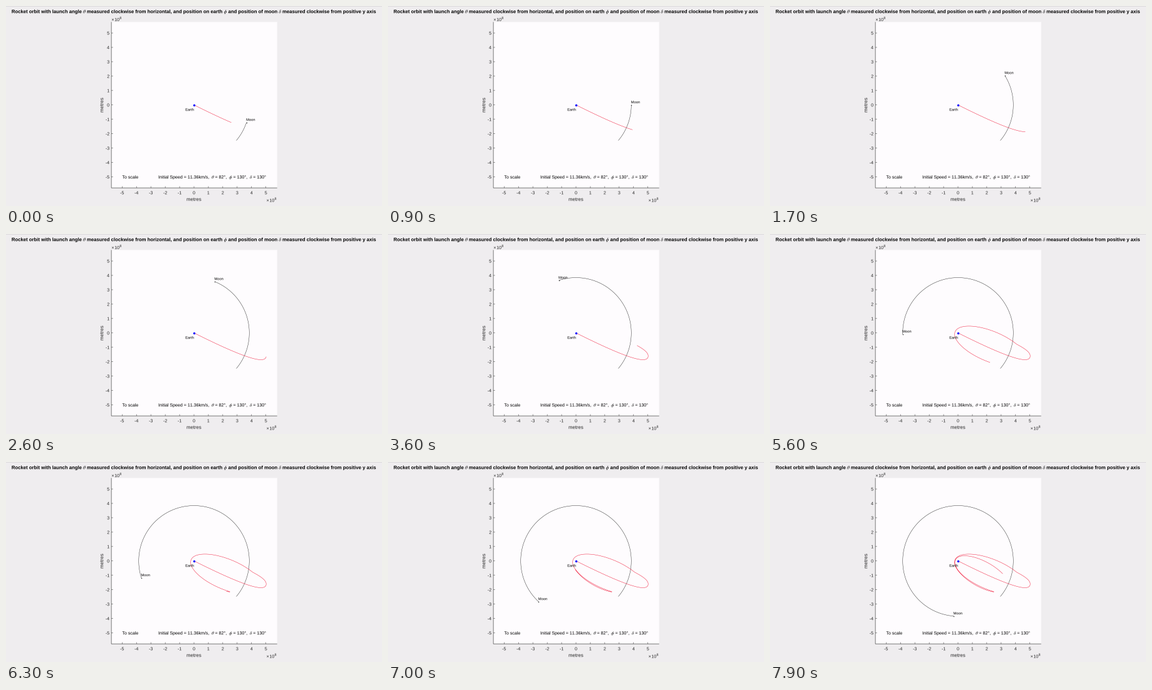
These frames come from a looping animation (600 px wide and 319 px high, 8 s). A matplotlib script:

```python
import numpy as np
import matplotlib.pyplot as plt
from matplotlib.animation import FuncAnimation
from matplotlib.patches import PathPatch, Rectangle
from matplotlib.textpath import TextPath
from matplotlib.transforms import Affine2D

W, H, DPI = 600, 319, 64
PT = 72 / DPI                      # points per pixel
FRAMES, STEP = 80, 100
CX, CY, UNIT = 300, 157.8, 22.95   # earth position, pixels per 1e8 m
MOON_R = 3.845 * UNIT
PERIOD = 0.017                     # frames per radian of mean anomaly / a^1.5
INK = "#262626"

plt.rcParams["mathtext.fontset"] = "stix"


def moon_angle(i):
    """Degrees counter-clockwise from +x; slower at the start and near t=60."""
    return np.interp(i, [0, 9, 36, 56, 63, 79],
                     [-18.5, 0, 108.1, 181.3, 197.8, 265.5])


def bezier(p, t0, t1, n=200):
    """Cubic curve relative to earth, as rows of time, x, y."""
    u = np.linspace(0, 1, n)
    b = np.column_stack([(1 - u)**3, 3*u*(1 - u)**2, 3*u*u*(1 - u), u**3])
    return np.column_stack([t0 + u * (t1 - t0), b @ np.array(p) + (CX, CY)])


def kepler(p, e, axis, start, end, perigee, n=600):
    """Conic with earth at the focus, timed by Kepler's equation."""
    nu = np.radians(np.linspace(start, end, n))
    r = p / (1 + e * np.cos(nu))
    ecc = 2 * np.arctan(np.sqrt((1 - e) / (1 + e)) * np.tan(nu / 2))
    mean = (ecc - e * np.sin(ecc)) * np.sign(end - start)
    t = perigee + PERIOD * (p / (1 - e * e))**1.5 * mean
    a = nu + np.radians(axis)
    return np.column_stack([t, CX + r * np.cos(a), CY - r * np.sin(a)])


inbound = kepler(9.6, 0.918, 157.5, -168.3, 161.9, 49.4)
rebound = kepler(8.57, 0.907, 151.2, 167.8, -167.5, 70.6)
launch = bezier([(0, 0), (75, 37.5), (115.2, 52), (115.2, 36.7)], -12.1, 27)
turn = bezier([(115.2, 36.7), (115.2, 30), (104, 23.5),
               inbound[0, 1:] - (CX, CY)], 27, inbound[0, 0])
ROCKET = np.vstack([launch, turn, inbound, rebound])

fig = plt.figure(figsize=(W / DPI, H / DPI), dpi=DPI, facecolor="#efedef")
ax = fig.add_axes([0, 0, 1, 1])
ax.set_xlim(0, W)
ax.set_ylim(H, 0)
ax.axis("off")


def place(x, y, dx=0, turn=0):
    return (Affine2D().translate(dx, 0).rotate_deg(turn).scale(1, -1)
            .translate(x, y) + ax.transData)


def label(x, y, s, size=7.05, ha="left", color="black", weight="normal", turn=0):
    path = TextPath((0, 0), s, size=size,
                    prop={"family": "Liberation Sans", "weight": weight})
    box = path.get_extents()
    dx = {"left": 0, "center": -(box.x0 + box.x1) / 2, "right": -box.x1}[ha]
    return ax.add_patch(PathPatch(path, fc=color, lw=0, snap=False, zorder=6,
                                  transform=place(x, y, dx, turn)))


def line(xs, ys, color=INK, width=0.6, z=2):
    return ax.plot(xs, ys, color=color, lw=width * PT, zorder=z, snap=False,
                   solid_capstyle="butt")[0]


def dot(x, y, size, color):
    return ax.plot([x], [y], "o", ms=size * PT, color=color, mew=0, zorder=5)[0]


def exponent(x, y):
    label(x, y, "×", color=INK)
    label(x + 4.8, y, "10", color=INK)
    label(x + 12.9, y - 3.2, "8", 5.4, color=INK)


# Static chart
L, R, T, B = 168.1, 432.7, 25.5, 290.1
ax.add_patch(Rectangle((L, T), R - L, B - T, fc="#fefcfe", ec="none",
                       snap=False, zorder=1))
line([0, W], [0.5, 0.5], "#dcdadc", 1)
line([L, L], [T, B])
line([L, R], [B, B])
for k in range(-5, 6):
    x, y = CX + k * UNIT, CY + k * UNIT
    line([x, x], [B, B - 2.6], width=0.5)
    line([L, L + 2.6], [y, y], width=0.5)
    label(x, 300.3, str(k), ha="center", color=INK)
    label(164.8, y + 2.6, str(-k), ha="right", color=INK)
exponent(168.4, 24.1)
exponent(415.6, 312.4)
label(300, 310.8, "metres", 7.75, "center", INK)
label(155.3, 158, "metres", 7.75, "center", INK, turn=90)
label(299.8, 11.4,
      r"Rocket orbit with launch angle $\theta$ measured clockwise from "
      r"horizontal, and position on earth $\phi$ and position of moon "
      r"$\delta$ measured clockwise from positive y axis",
      7.73, "center", weight="bold")
label(185.4, 275.2, "To scale")
label(243, 275.2, r"Initial Speed = 11.36km/s,  $\theta$ = 82°,  "
                  r"$\phi$ = 130°,  $\delta$ = 130°")
label(286.2, 167.2, "Earth", 5.75)
dot(CX, CY, 3.4, "#0000ff")

# Moving parts
moon_trail = line([], [], "#1c1c1c", 0.45, 3)
rocket_trail = line([], [], "#f01c3c", 0.5, 4)
moon = dot(0, 0, 1.5, "#333333")
moon_label = label(0, 0, "Moon", 5.75)


def draw(i):
    a = np.radians(np.linspace(-40, moon_angle(i), 240))
    xs, ys = CX + MOON_R * np.cos(a), CY - MOON_R * np.sin(a)
    moon_trail.set_data(xs, ys)
    moon.set_data(xs[-1:], ys[-1:])
    moon_label.set_transform(place(xs[-1] - 0.5, ys[-1] - 2.6))

    t, x, y = ROCKET.T
    done = t <= i
    rocket_trail.set_data(np.r_[x[done], np.interp(i, t, x)],
                          np.r_[y[done], np.interp(i, t, y)])
    return moon_trail, rocket_trail, moon, moon_label


anim = FuncAnimation(fig, draw, frames=FRAMES, interval=STEP,
                     repeat=True, repeat_delay=0, blit=False)
plt.show()
```
